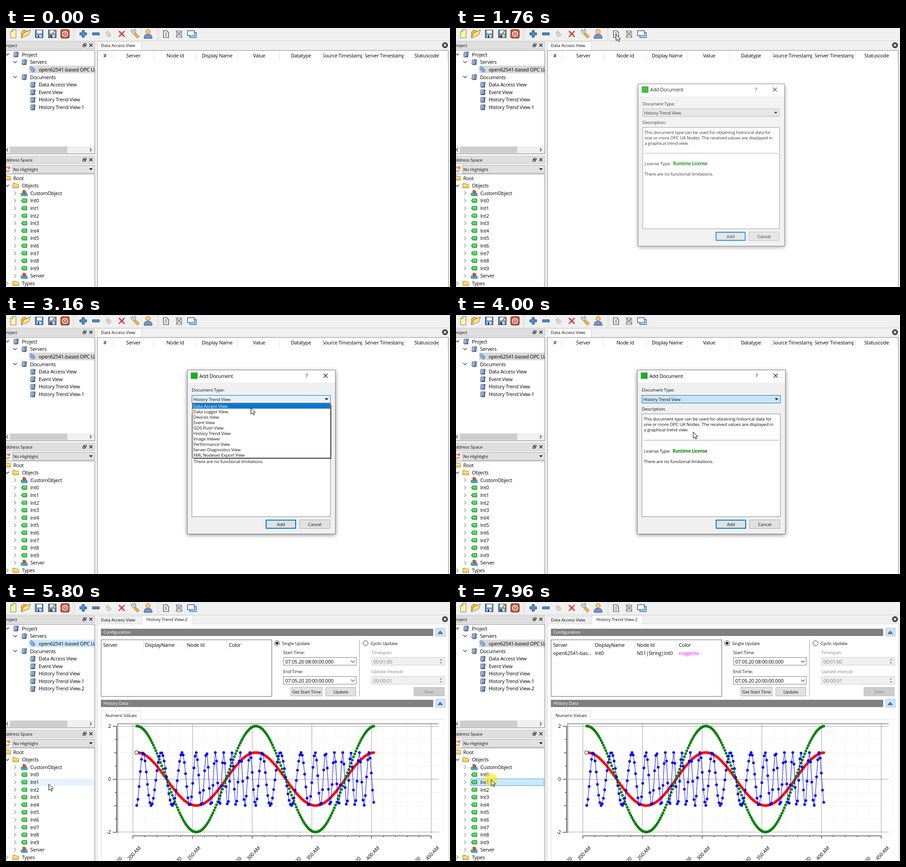
These frames come from a looping animation (978x572 px, 8 s). An HTML page:

```html
<!DOCTYPE html>
<html lang="en">
<head>
<meta charset="utf-8">
<title>Adding a history trend view</title>
<style>
html, body { margin: 0; width: 100%; height: 100%; overflow: hidden; background: #f0f0f0 }
svg { display: block }
text { font: 11px "Open Sans", "Noto Sans", sans-serif; letter-spacing: -.27px; white-space: pre }
.small { font-size: 9.8px; letter-spacing: -.165px }
.bold { font-weight: 700; letter-spacing: -.3px }
.crisp { shape-rendering: crispEdges }

#dialog { transform-origin: 562px 302px; animation: dialog 8s linear infinite }
@keyframes dialog {
  0%, 19.5% { opacity: 0; transform: scale(.93) }
  22% { opacity: .82; transform: scale(.988) }
  24.5%, 56% { opacity: 1; transform: none }
  58.5%, 100% { opacity: 0; transform: scale(.95) }
}
.highlight { animation: highlight 8s step-end infinite }
@keyframes highlight {
  0% { transform: translateY(60px) }
  37.5% { transform: none }
  40.5% { transform: translateY(12px) }
  41.5% { transform: translateY(24px) }
  42.5% { transform: translateY(36px) }
  44.5%, 100% { transform: translateY(60px) }
}
#cursor { animation: cursor 8s linear infinite }
@keyframes cursor {
  0%, 5.5% { transform: translate(866px, 488px) }
  10% { transform: translate(600px, 230px) }
  15.5% { transform: translate(354px, 16px) }
  16.5%, 22.5% { transform: translate(352px, 14px) }
  25% { transform: translate(590px, 178px) }
  28%, 33% { transform: translate(575px, 186px) }
  37% { transform: translate(545px, 198px) }
  38.5%, 40% { transform: translate(539px, 205px) }
  42.5% { transform: translate(530px, 240px) }
  45%, 50.5% { transform: translate(522px, 258px) }
  54%, 64% { transform: translate(609px, 467px) }
  72.5% { transform: translate(94px, 402px) }
  73.5% { transform: translate(79px, 390px) }
  74.5%, 77.5% { transform: translate(77px, 388px) }
  82%, 91% { transform: translate(320px, 181px) }
  96.5% { transform: translate(79px, 389px) }
  99.5%, 100% { transform: translate(77px, 392px) }
}
</style>
</head>
<body>
<svg id="stage" width="978" height="572" viewBox="0 0 978 572"></svg>
<script>
(() => {
let css = '', showCount = 0;

// Content visible only between two times of the 8 s loop
const during = (from, to, content) => {
  const name = 'show' + ++showCount;
  css += `@keyframes ${name}{0%{visibility:hidden}${from / 80}%{visibility:visible}${to / 80}%,100%{visibility:hidden}}`;
  return `<g style="animation:${name} 8s step-end infinite">${content}</g>`;
};
const text = (x, y, s, fill = '#000', extra = '') => `<text x="${x}" y="${y + 4}" fill="${fill}" ${extra}>${s}</text>`;
const small = (x, y, s, fill = '#111', extra = '') =>
  `<text class="small" x="${x}" y="${y + 3.5}" fill="${fill}" ${extra}>${s}</text>`;
const middle = 'text-anchor="middle"';
const rect = (x, y, w, h, fill, stroke) => stroke
  ? `<rect class="crisp" x="${x + .5}" y="${y + .5}" width="${w - 1}" height="${h - 1}" fill="${fill}" stroke="${stroke}"/>`
  : `<rect class="crisp" x="${x}" y="${y}" width="${w}" height="${h}" fill="${fill}"/>`;
const path = (d, stroke, width = 1, fill = 'none', extra = '') =>
  `<path d="${d}" stroke="${stroke}" stroke-width="${width}" fill="${fill}" ${extra}/>`;
const at = (x, y, content) => `<g transform="translate(${x} ${y})">${content}</g>`;
const each = (list, fn) => list.map(fn).join('');
const range = n => Array.from({ length: n }, (_, i) => i);

const cross = (x, y, r, color = '#222', width = 1.2) =>
  path(`M${x - r} ${y - r}l${2 * r} ${2 * r}m0 ${-2 * r}l${-2 * r} ${2 * r}`, color, width);
const expanded = (x, y) => path(`M${x - 4} ${y - 2}l4 4 4-4`, '#404040', 1.3);
const collapsed = (x, y) => path(`M${x - 2} ${y - 4}l4 4-4 4`, '#888', 1.2);
const dropArrow = (x, y) => path(`M${x - 4} ${y - 2}h8l-4 4z`, 'none', 0, '#111');
const button = (x, y, w, h, label, off) => rect(x, y, w, h, off ? '#ccc' : '#e1e1e1', off ? '#bfbfbf' : '#adadad') +
  small(x + w / 2, y + h / 2, label, off ? '#838383' : '#111', middle);

const icons = {
  book: path('M-4-5h9l-1 10h-9z', '#34517c', 1, '#7d9fcd') + path('M-2-5l-1 10', '#c4d7ef', 1.5) + path('M5-5l-1 11h-8', '#222'),
  plug: path('M-6-4l3-3 8 8-3 5-5-2-3-5z', '#3f68ab', 1, '#9fc0ec') + path('M-4-2l8 7m-6-9l7 7', '#4771b5'),
  folder: path('M-7 5v-9l1-1h4l2 2h6v8z', '#a9780f', 1, '#f3cf62') + path('M-6-1h12', '#fff3b5', 1.5),
  tag: path('M-6 0l3-4h8q1 0 1 1v6q0 1-1 1h-8z', '#167a2c', 1.2, '#48dc58') + path('M-3-2h7', '#a4f5a8'),
  cubes: path('M-3-6h5l2 2v4h-7z', '#9c2517', .8, '#e5533c') + path('M-7 0h6v6h-5l-1-2z', '#237239', .8, '#4fc06a') +
    path('M0 0h6l1 2v4h-7z', '#1d5ca5', .8, '#4fa0ec')
};
const icon = (name, x, y) => at(x, y, icons[name]);

const disk = rect(-9, -9, 18, 18, '#5f8fc5', '#1e3a5c') + rect(-5, -8, 11, 7, '#fff') + rect(-5, 2, 10, 6, '#d5dde6') + rect(-3, 3, 3, 5, '#334');
const tools = [
  [16, path('M-6 9v-14l5-5h7v19z', '#77704a', 1, '#fff6ae') + path('M-6-5h5v-5', '#77704a')],
  [44, path('M-10 8v-12l4-4h5l2 2h5v4', '#8d6914', 1, '#e8bf48') + path('M-10 9l5-11 15-7-4 11z', '#8d6914', 1, '#ffe48a')],
  [73, disk],
  [102, disk + path('M-4 5l10-13', '#d18b1c', 3) + path('M-5 7l2-4', '#222', 2)],
  [130, '<rect x="-9.5" y="-9.5" width="19" height="19" rx="3" fill="#c5533a" stroke="#7c2717"/>' +
    '<circle r="5.5" fill="none" stroke="#fff" stroke-width="2"/>' + path('M0-3v5', '#fff', 2)],
  [170, path('M-2.5-7.5h5v5h5v5h-5v5h-5v-5h-5v-5h5z', '#153f72', 1, '#4d8fcd')],
  [198, path('M-7.5-2.5h15v5h-15z', '#153f72', 1, '#4d8fcd')],
  [226, path('M-6-3l4-4 8 9-3 4-6-1z', '#aaa', 1, '#ddd') + path('M-2-1l6 7m-9-8l8 1', '#bbb')],
  [255, path('M-6-2l4-4 7 7-3 5z', '#9ab', 1, '#dbe7f4') + cross(0, 0, 6.5, '#e11a10', 2)],
  [284, path('M-1-1l9 9', '#8e6714', 6) + path('M-1-1l9 9', '#f2b843', 4) +
    path('M-9-7l3-3 2 4 3-1 0-4q5 3 2 8-3 4-7 1-3-2-3-5z', '#777', 1, '#d6d9dd')],
  [313, path('M-9 10q0-9 6-9h5q7 0 7 9z', '#39527f', 1, '#7793c4') + '<circle cy="-5" r="5" fill="#f3c984" stroke="#a3762b"/>'],
  [352, path('M-5-7h7l4 4v11h-11z', '#222', 1.2, '#fff') + path('M-2-2h5m-5 3h5m-5 3h5', '#333', 1.2)],
  [381, path('M-5-7h7l4 4v11h-11z', '#777', 1.2, '#ddd') + cross(0, 0, 7, '#777', 1.4)],
  [409, path('M-4 4v4h14v-11h-4', '#2464a6', 1.5, '#d6e7fa') + path('M-9-7h15v11h-15z', '#2464a6', 1.5, '#fff')]
];
const toolStrip = during(1240, 1560, rect(340, 0, 24, 26, '#cde6f7', '#90c8f6')) +
  each(tools, ([x, art]) => at(x, 13, art)) +
  each([148, 151, 333, 336], x => path(`M${x} 1v25`, '#a8a8a8', 1, 'none', 'stroke-dasharray="1 2"'));

const rowY = i => 58.5 + 16.6 * i, nodeY = i => 331.5 + 16.6 * i;
const dockTitle = (y, label) => rect(-1, y - 8, 197, 17, '#dfdfdf', '#c6c6c6') + small(-6, y, label) +
  path(`M171.5 ${y - 3.5}h5v4h-5zm-2 3h5v4h-5z`, '#111', 1.1, '#eee') + cross(187, y, 3.3, '#111', 1.4);
const viewRow = (i, label) => icon('book', 59, rowY(i)) + text(72, rowY(i), label);

const projectDock = dockTitle(38, 'Project') + rect(-1, 49, 197, 229, '#fff', '#828790') +
  rect(51, 83, 144, 17, '#d9d9d9') + during(4680, 6200, rect(51, 83, 144, 17, '#cce8ff')) +
  expanded(3, 58) + icon('book', 22, 58) + text(35, 58.5, 'Project') +
  expanded(20, 75) + icon('book', 40, 75) + text(53, 75, 'Servers') +
  icon('plug', 59, 91.5) + text(72, 91.5, 'open62541-based OPC UA') +
  expanded(20, 108) + icon('book', 40, 108) + text(53, 108.5, 'Documents') +
  each(['Data Access View', 'Event View', 'History Trend View', 'History Trend View-1'], (s, i) => viewRow(i + 4, s)) +
  during(4680, 8000, viewRow(8, 'History Trend View-2')) +
  rect(0, 261, 195, 16, '#f0f0f0') + rect(9, 262, 126, 14, '#cdcdcd') +
  path('M4 265.5l-3 3.5 3 3.5M185 265.5l3 3.5-3 3.5', '#444', 1.4);

const rowBand = (i, fill, stroke) => rect(32, Math.round(nodeY(i) - 8), 162, 16, fill, stroke);
const nodes = ['CustomObject', ...range(10).map(i => 'Int' + i), 'Server'];
const addressDock = dockTitle(291, 'Address Space') + rect(14, 303, 182, 18, '#e1e1e1', '#adadad') +
  small(16, 312, 'No Highlight') + dropArrow(187, 312) +
  path('M0 309q4-4 8 0m0 5q-4 5-8 1M8 305v5h-4', '#e8762b', 2) +
  rect(-1, 322, 197, 260, '#fff', '#828790') +
  during(5680, 5840, rect(30, 390, 165, 16, '#e5f3ff')) +
  during(5840, 6200, rect(30, 373, 165, 17, '#e5f3ff')) +
  during(6200, 7720, rowBand(3, '#cce8ff', '#6ab4e8')) +
  during(7640, 7720, rect(30, 390, 165, 16, '#e5f3ff')) +
  during(7720, 8000, rowBand(4, '#cce8ff', '#4aa3df')) +
  icon('folder', 4, 331) + text(16, 331.5, 'Root') +
  expanded(3, 348) + icon('folder', 22, 348) + text(35, 348, 'Objects') +
  each(nodes, (s, i) => collapsed(20, nodeY(i + 2)) + icon(s.startsWith('Int') ? 'tag' : 'cubes', 40, nodeY(i + 2)) +
    text(53.5, nodeY(i + 2), s)) +
  collapsed(3, 564) + icon('folder', 22, 564) + text(35, 564, 'Types') + rect(196, 29, 5, 543, '#f0f0f0');

const columns = ['Server', 'Node Id', 'Display Name', 'Value', 'Datatype', 'Source Timestamp', 'Server Timestamp', 'Statuscode'];
const dataView = rect(201, 30, 98, 21, '#fff', '#d5d5d5') + small(209, 38.5, 'Data Access View') +
  rect(201, 49, 774, 530, '#fff', '#828790') + text(218, 61, '#', '#000', middle) +
  each(columns, (s, i) => {
    const x = 234 + 92.3 * i;
    return rect(Math.round(x) - 1, 51, 1, 21, '#dedede') +
      `<svg x="${x + 3}" y="50" width="86" height="24">${text(43.5, 11, s, '#000', middle)}</svg>`;
  }) + rect(972, 51, 1, 21, '#dedede');

const closeTab = '<circle cx="967" cy="38" r="6.5" fill="#3c3c3c"/>' + cross(967, 38, 2.6, '#fff', 1.7);
const sectionBar = (y, label) => rect(209, y, 732, 16, '#808080') + small(214.5, y + 7.5, label, '#fff') +
  rect(946, y - 2, 22, 19, '#cce4f7', '#a6cdec') + path(`M951.5 ${y + 11}l5-6 5 6z`, '#334', 1, '#77879a');
const radio = (x, label, on) => `<circle cx="${x}" cy="91" r="5.5" fill="#fff" stroke="#333"/>` +
  (on ? `<circle cx="${x}" cy="91" r="3" fill="#222"/>` : '') + small(x + 11, 91.5, label);
const timeField = (y, label, value) => small(610.5, y - 20, label) + rect(611, y - 9, 161, 18, '#fff', '#7a7a7a') +
  text(615, y + .5, value) + path(`M760 ${y - 1.5}l4 4 4-4`, '#444', 1.1);
const spinField = (y, label, value) => small(805, y - 20, label, '#838383') + rect(805, y - 9, 162, 18, '#f0f0f0', '#ccc') +
  text(809, y + .5, value, '#838383') + path(`M955 ${y - 2}l3-3 3 3zm0 4l3 3 3-3z`, 'none', 0, '#888');

const cells = (y, labels) => each(labels, (s, i) => text(214 + 92.3 * i, y, s, s === 'magenta' ? '#f0f' : '#000'));
const configuration = sectionBar(59, 'Configuration') + rect(209, 83, 377, 126, '#fff', '#646464') +
  cells(95, ['Server', 'DisplayName', 'Node Id', 'Color']) + each([302, 394, 486], x => rect(x, 84, 1, 22, '#dedede')) +
  during(6880, 8000, cells(112.5, ['open62541-bas...', 'Int0', 'NS1|String|Int0', 'magenta'])) +
  radio(597, 'Single Update', true) + timeField(131, 'Start Time:', '07.05.20 08:00:00.000') +
  timeField(173, 'End Time:', '07.05.20 20:00:00.000') + button(627, 188, 70, 20, 'Get Start Time') + button(704, 188, 67, 20, 'Update') +
  rect(778, 83, 1, 126, '#a0a0a0') + radio(792, 'Cyclic Update') + spinField(131, 'Timespan:', '00:01:00') +
  spinField(173, 'Update Interval:', '00:00:01') + button(898, 188, 68, 20, 'Start', true);

const TAU = 2 * Math.PI;
const samples = wave => range(200).map(i => {
  const x = 288 + 2.623 * i;
  return [x.toFixed(1), (391 - 58.5 * wave(x)).toFixed(1)];
});
const dots = (points, color) => path(each(points, p => `M${p}h0`), color, 6, 'none', 'stroke-linecap="round"');
const slow = x => Math.cos(TAU * (x - 288) / 262.5);
const swept = x => {
  const u = (x - 352) / 262.2;
  return Math.cos(TAU * (10 * u - .75 * Math.sin(TAU * u) + .205));
};
const chirp = samples(swept);
const tickX = i => 279.5 + 26.28 * i, majorX = i => tickX(5 * i);
const dashed = d => path(d, '#e4e4e4', 1, 'none', 'stroke-dasharray="2 2"');
const grid = each(range(27), i => i % 5 ? dashed(`M${tickX(i)} 270v241`) : '') +
  each([303.5, 332.5, 362.5, 420.5, 449.5, 479.5], y => dashed(`M247 ${y}h706`)) +
  each(range(6), i => path(`M${majorX(i)} 270v241`, '#a0a0a0')) +
  each([274.5, 391.5, 508], y => path(`M246 ${y}h707`, '#a0a0a0')) +
  path('M953 269h-707v242', '#999', 2);
const slanted = (x, y, s) => `<text transform="translate(${x} ${y}) rotate(-47)" text-anchor="end">${s}</text>`;
const axes = path('M243.5 274v235', '#000') + path('M279 516.5h658', '#000') +
  each(range(9), i => path(`M243 ${274.5 + 29.25 * i}h${i % 4 ? (i % 2 ? -3 : -5) : -8}`, '#000')) +
  each(range(26), i => path(`M${tickX(i)} 516v${i % 5 ? 3 : 7}`, '#000')) +
  each([2, 0, -2], v => text(231, 391 - 58.5 * v, v, '#000', 'text-anchor="end"')) +
  each(range(6), i => slanted(majorX(i) + 18, 544, 200 + 50 * i + ' AM') + slanted(majorX(i) - 23, 567, '20'));
const chart = sectionBar(216, 'History Data') + path('M209.5 572v-331.5h87v18.5h670', '#d9d9d9') +
  small(219, 250, 'Numeric Values') + grid + axes +
  dots(samples(slow), 'red') + dots(samples(x => 2 * slow(x)), 'green') +
  path('M' + chirp.join('L'), '#00f') + dots(chirp, '#00f') +
  during(5480, 8000, '<circle cx="287.5" cy="332.5" r="4" fill="#fff" stroke="#000"/>');

const trendView = rect(201, 29, 774, 20, '#f0f0f0') + rect(201, 31, 99, 18, '#f0f0f0', '#d9d9d9') + small(209, 39.5, 'Data Access View') +
  rect(201, 48, 774, 540, '#fff', '#d9d9d9') + rect(299, 29, 113, 21, '#fff', '#d9d9d9') + rect(300, 47, 111, 4, '#fff') +
  small(309, 38.5, 'History Trend View-2') + closeTab + configuration + chart;

const kinds = ['Data Access View', 'Data Logger View', 'Devices View', 'Event View', 'GDS Push View', 'History Trend View',
  'Image Viewer', 'Performance View', 'Server Diagnostics View', 'XML Nodeset Export View'];
const kindList = fill => each(kinds, (s, i) => small(412.5, 201.5 + 12 * i, s, fill));
const popup = rect(413, 198, 304, 120, '#777') + rect(410, 194, 305, 122, '#fff', '#555') + kindList('#111') +
  '<clipPath id="row"><rect class="highlight" x="411" y="195" width="303" height="12"/></clipPath>' +
  `<g clip-path="url(#row)">${rect(411, 195, 303, 120, '#0078d7')}${kindList('#fff')}</g>` +
  '<rect class="highlight" x="411.5" y="195.5" width="302" height="11" fill="none" stroke="#e08a3c" stroke-dasharray="1 1"/>';
const description = ['This document type can be used for obtaining historical data for',
  'one or more OPC UA Nodes. The received values are displayed in', 'a graphical trend view.'];
const dialog = '<rect x="399" y="122" width="327" height="362" style="filter:drop-shadow(0 2px 5px #0007)"/>' +
  rect(399, 121, 327, 363, '#f0f0f0', '#7d7d7d') + rect(400, 122, 325, 27, '#fff') + rect(407, 127, 15, 14, '#1faa2b') +
  text(426, 134.5, 'Add Document') + text(662, 134, '?', '#000', middle) + cross(704, 134, 4.5, '#111', 1.1) +
  small(409, 165.5, 'Document Type:') + rect(409, 177, 306, 18, '#e1e1e1', '#adadad') +
  during(2160, 3800, rect(409, 177, 306, 18, '#e5f1fb', '#0078d7')) +
  during(3800, 4680, rect(409, 177, 306, 18, '#cce4f7', '#0078d7')) +
  small(412.5, 186, 'History Trend View') + dropArrow(706, 186) + small(409, 207, 'Description:') +
  rect(409, 218, 306, 228, '#fff', '#828790') + each(description, (s, i) => small(413.5, 229.5 + 12 * i, s)) +
  rect(414, 276, 298, 1, '#999') + small(413.5, 300, 'License Type:') +
  '<text class="small bold" x="477" y="303.5" fill="green">Runtime License</text>' +
  small(413.5, 323, 'There are no functional limitations.') +
  button(572, 452, 67, 20, 'Add') + '<rect x="573" y="453" width="65" height="18" fill="none" stroke="#0078d7" stroke-width="2"/>' +
  button(646, 452, 68, 20, 'Cancel') + during(2560, 3800, popup);

const arrow = path('M.5.5v13.5l3.2-3 2.2 5 2.3-1-2.2-4.8h4.3z', '#000', 1, '#fff');
const glow = '<circle r="14" fill="#ffe600" opacity=".6"/>';
const cursor = during(6200, 6880, glow) + during(7720, 8000, glow) + during(440, 4680, arrow) + during(5600, 8000, arrow) +
  during(4680, 5600, path('M-11 0h22M0-11v22', '#000', 1.6));

const scene = rect(0, 0, 978, 572, '#f0f0f0') + path('M0 28.5h978', '#d0d0d0') + toolStrip + projectDock + addressDock +
  dataView + closeTab + during(4680, 8000, trendView) + `<g id="dialog">${dialog}</g><g id="cursor">${cursor}</g>`;
document.getElementById('stage').innerHTML = `<style>${css}</style>${scene}`;
})();
</script>
</body>
</html>
```
